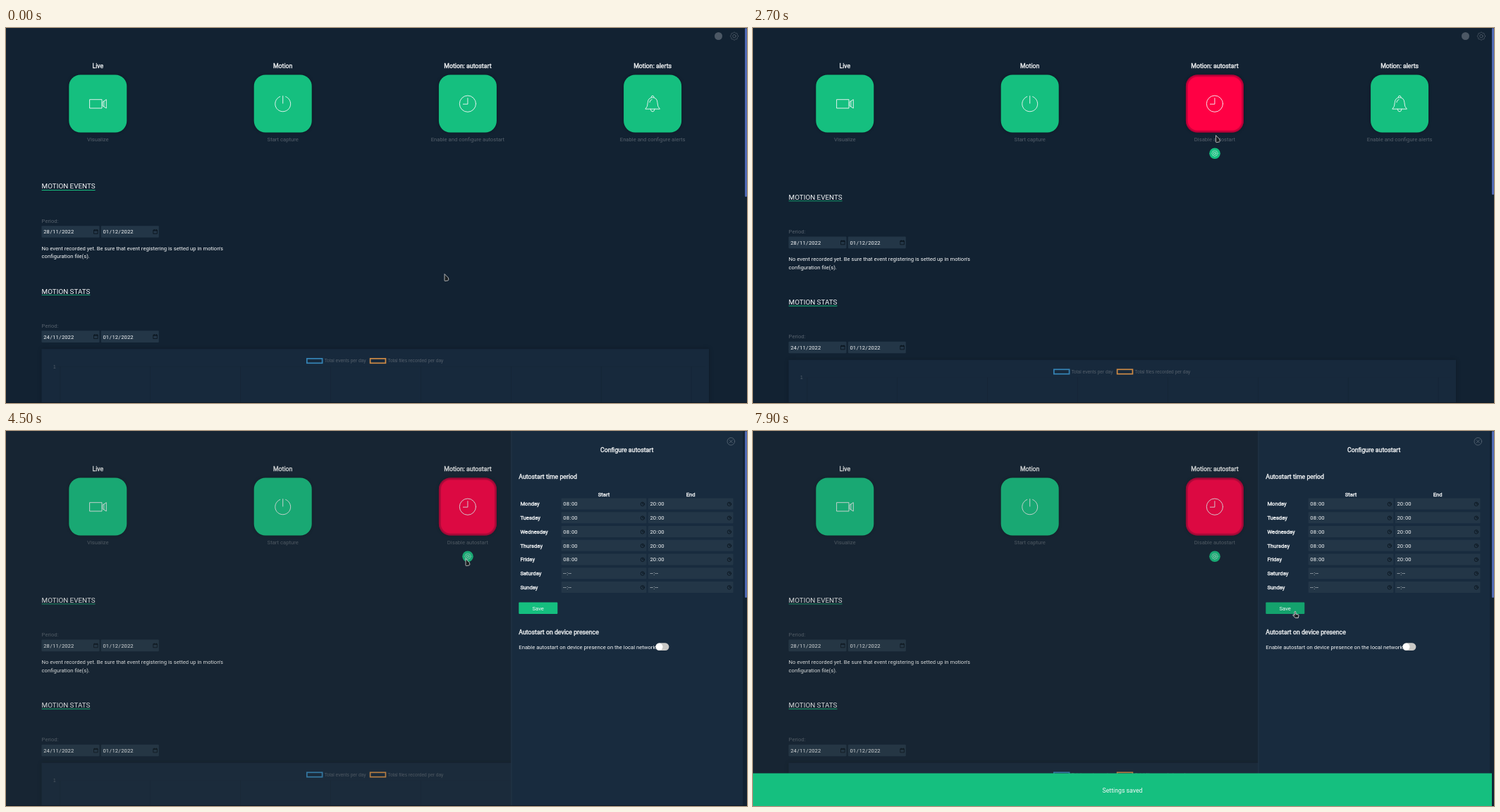
Recreate the animation shown at these times as an HTML page with a canvas. Size 1051 by 533 pixels, loop 8000 ms.

```html
<!DOCTYPE html>
<html lang="en">
<head>
<meta charset="utf-8">
<title>Motion dashboard</title>
<style>
  html, body { margin: 0; width: 100%; height: 100%; overflow: hidden; background: #122232; }
  canvas { display: block; }
</style>
</head>
<body>
<canvas id="stage" width="1051" height="533"></canvas>
<script>
const ctx = document.getElementById('stage').getContext('2d');
const LOOP = 8000, STEP = 100;
const GREEN = '#15bf7f', HOVER = '#14a26d', WHITE = '#f5f7f8', GREY = '#55606c', INPUT = '#233647', DARK = '#0a131c';
const SMALL = 7.66, MEDIUM = 8.76, LARGE = 9.85;

// Pointer tip: time, x, y
const pointer = [
  [0, 622, 350], [200, 622, 340], [500, 633, 252], [800, 644, 167], [900, 646, 153],
  [1000, 649, 147], [1400, 658, 138], [2600, 658, 138], [2800, 655, 168], [3000, 654, 182],
  [3600, 654, 182], [3700, 652, 182], [4500, 652, 182], [4800, 715, 158], [5100, 830, 147],
  [5400, 919, 186], [5600, 921, 215], [5700, 915, 233], [5900, 800, 195], [6000, 790, 145],
  [6200, 860, 90], [6300, 885, 85], [6400, 910, 130], [6500, 923, 166], [6600, 923, 166],
  [7000, 850, 222], [7400, 768, 256], [8000, 768, 256]
];

const clamp = v => Math.max(0, Math.min(1, v));
const swing = v => .5 - Math.cos(Math.PI * clamp(v)) / 2;
const mix = (a, b, p) => a + (b - a) * p;

function pointerAt(t) {
  const i = pointer.findIndex(k => k[0] > t);
  const a = pointer[i - 1], b = pointer[i], p = (t - a[0]) / (b[0] - a[0]);
  return [mix(a[1], b[1], p), mix(a[2], b[2], p)];
}

function box(x, y, w, h, fill, r = 0) {
  ctx.fillStyle = fill;
  ctx.beginPath();
  ctx.roundRect(x, y, w, h, r);
  ctx.fill();
}

function text(str, x, y, { size = SMALL, color = WHITE, align = 'left', bold = false, font = 'Roboto' } = {}) {
  ctx.font = `${size}px ${font}, sans-serif`;
  ctx.textAlign = align;
  ctx.fillStyle = ctx.strokeStyle = color;
  ctx.fillText(str, x, y);
  if (bold) {
    ctx.lineWidth = .35;
    ctx.strokeText(str, x, y);
  }
}

function shape(d, x, y, stroke = WHITE, width = .9, fill) {
  const path = new Path2D(d);
  ctx.save();
  ctx.translate(x, y);
  ctx.lineJoin = ctx.lineCap = 'round';
  if (fill) { ctx.fillStyle = fill; ctx.fill(path); }
  ctx.strokeStyle = stroke;
  ctx.lineWidth = width;
  ctx.stroke(path);
  ctx.restore();
}

const circle = r => `M${r} 0A${r} ${r} 0 1 1 ${-r} 0A${r} ${r} 0 1 1 ${r} 0Z`;

function cog(x, y, r, color) {
  let d = circle(r * .4);
  for (let i = 0; i <= 48; i++) {
    const a = i * Math.PI / 24, q = r * (.92 + .08 * Math.cos(8 * a));
    d += `${i ? 'L' : 'M'}${q * Math.cos(a)} ${q * Math.sin(a)}`;
  }
  shape(d, x, y, color, .7);
}

// Date and time inputs pad every group of digits
function segments(str, x, y) {
  for (const part of str.split(/([:/])/)) {
    const pad = /[:/]/.test(part) ? 0 : .55;
    text(part, x + pad, y);
    x += ctx.measureText(part).width + 2 * pad;
  }
}

function dateInput(str, x, y) {
  box(x, y, 82, 16.6, INPUT, 1);
  segments(str, x + 2.2, y + 11.2);
  shape('M-2.6-2.2H2.6V3H-2.6ZM-2.6-1.4H2.6M-1.5-3V-2M1.5-3V-2', x + 77, y + 8.2, DARK, .8);
}

function timeInput(str, x, y, w) {
  box(x, y - 8, w, 16, INPUT, 1);
  segments(str, x + 2.2, y + 2.8);
  shape(circle(2.7) + 'M0-1.6V0H1.4', x + w - 5.6, y + .3, DARK, .8);
}

const icons = {
  camera: 'M-11.3-6H5.7V6.3H-11.3ZM6.8-2.5L8.6-3.8V4.2L6.8 3ZM8.6-3.8L12-6V6.3L8.6 4.2',
  power: 'M-4-10.2A11 11 0 1 0 4-10.2M0-11V-.6',
  clock: circle(11.6) + 'M0-8V.5H-6.5',
  bell: 'M-10 7.2Q-6.8 4.5-6.8-2Q-6.3-8.5 0-9Q6.3-8.5 6.8-2Q6.8 4.5 10 7.2ZM-2-9.2Q-1.7-11.5 0-11.5Q1.7-11.5 2-9.2M-3 7.4Q-2.5 11.2 0 11.2Q2.5 11.2 3 7.4M-4.3-2Q-4-5.5-1-6.2'
};

function tile(x, title, icon, label, color, active) {
  text(title, x, 57, { size: MEDIUM, align: 'center', bold: true });
  ctx.shadowColor = 'rgba(0,0,0,.3)';
  ctx.shadowBlur = 4;
  box(x - 41, 66.5, 82, 82, color, 16.4);
  ctx.shadowBlur = 0;
  if (active) {
    for (const w of [1.2, 3]) {
      ctx.strokeStyle = 'rgba(110,0,45,.35)';
      ctx.lineWidth = w;
      ctx.beginPath();
      ctx.roundRect(x - 41 + w / 2, 66.5 + w / 2, 82 - w, 82 - w, 16.4 - w / 2);
      ctx.stroke();
    }
  }
  shape(icons[icon], x, 107.7);
  text(label, x, 160.7, { color: GREY, align: 'center' });
}

function heading(str, y) {
  text(str, 50.6, y, { size: LARGE });
  box(50.6, y + 1.7, ctx.measureText(str).width, .9, GREEN);
}

function period(from, y) {
  text('Period:', 50.6, y, { color: GREY });
  dateInput(from, 50.5, y + 4.3);
  dateInput('01/12/2022', 134.8, y + 4.3);
}

function chart(y) {
  ctx.shadowColor = 'rgba(0,0,0,.25)';
  ctx.shadowBlur = 6;
  box(50.5, y, 946.5, 120, '#17293c');
  ctx.shadowBlur = 0;
  const label = { size: 6.57, color: GREY, font: 'Liberation Sans' };
  [['#3585b7', 'Total events per day', 426], ['#cd8a45', 'Total files recorded per day', 515.8]].forEach(([color, name, x]) => {
    ctx.strokeStyle = color;
    ctx.lineWidth = 1.7;
    ctx.strokeRect(x + .8, y + 13.6, 21.8, 6.4);
    text(name, x + 25.8, y + 18.8, label);
  });
  text('1', 67, y + 27.5, label);
  for (let x = 76.5; x < 990; x += 127.9) box(x, y + 25, .6, 100, 'rgba(0,0,0,.14)');
  box(72, y + 25, 920, .6, 'rgba(0,0,0,.08)');
}

function configButton(t) {
  const open = t < 4000 ? clamp((t - 2750) / 250) : 1 - clamp((t - 4000) / 400);
  const w = mix(15.6, 88.5, open), left = 655 - w / 2;
  ctx.save();
  box(left, 170.5, w, 15.4, open > 0 ? HOVER : GREEN, 7.7);
  ctx.clip();
  cog(left + 7.8, 178.2, 4.2, '#c9eedf');
  if (open > 0) text('Configure autostart', left + 16.3, 181);
  ctx.restore();
}

function tooltip() {
  box(657.2, 190.3, 73, 14, '#d0d0ce', 1);
  box(658, 191.1, 71.4, 12.4, '#1e2021');
  text('Configure autostart', 662, 199.7, { size: 6.92, color: '#dddddb', font: 'Noto Sans' });
}

function panel(p, saveHover) {
  const right = 1045, left = right - 328.6 * p, x = left + 10.9;
  const col = left + 71.2, w = Math.max(10, (1029.3 - col) / 2), end = col + w + 2.2;
  const bold = { bold: true }, center = { bold: true, align: 'center' };
  ctx.save();
  box(left, 0, right - left, 533, '#182b3e');
  ctx.clip();
  box(left, 0, .8, 533, '#2d4052');
  shape(circle(5.3) + 'M-2-2L2 2M2-2L-2 2', 1028.3, 14.8, '#5c6a78', .8);
  text('Configure autostart', (left + right) / 2, 29.6, { ...center, size: MEDIUM });
  text('Autostart time period', x, 67.8, { ...bold, size: MEDIUM });
  text('Start', col + w / 2, 92.7, center);
  text('End', end + w / 2, 92.7, center);
  ['Monday', 'Tuesday', 'Wednesday', 'Thursday', 'Friday', 'Saturday', 'Sunday'].forEach((day, i) => {
    const y = 103.6 + 19.74 * i;
    text(day, left + 13, y + 2.8, bold);
    timeInput(i < 5 ? '08:00' : '--:--', col, y, w);
    timeInput(i < 5 ? '20:00' : '--:--', end, y, w);
  });
  box(x, 243.4, 55, 16.6, saveHover ? HOVER : GREEN, 1);
  text('Save', x + 27.4, 254.6, { align: 'center' });
  text('Autostart on device presence', x, 289, { ...bold, size: MEDIUM });
  text('Enable autostart on device presence on the local network', x, 309.5);
  box(left + 204.8, 301.3, 19.2, 10.8, '#c9c9c6', 5.4);
  box(left + 205.3, 301.8, 9.8, 9.8, '#fff', 4.9);
  ctx.restore();
}

function drawPointer(x, y, hand) {
  if (hand) shape('M1.5 5.2V.9Q1.6 0 2.4 0Q3.2 0 3.3.9V3.8L6.4 4.4Q7.6 4.8 7.4 6L6.7 9.2H2.8L-.8 5.8Q-.9 4.6 0 4.6Z', x - 1.4, y + .4, '#f2f2f2', .8, '#202426');
  else shape('M0 0V8.8Q.2 9.9 1.2 9.6L5 8.9Q6 8.4 5.8 7.2L5.4 5.4Z', x, y, '#d8d8d8', .8, '#1b2022');
}

function draw(t) {
  const [px, py] = pointerAt(t);
  const active = t >= 1900, shift = active ? 15.4 : 0;
  const hover = active ? 0 : clamp((t - 900) / 400);
  const fade = `rgb(${mix(21, 20, hover)},${mix(191, 162, hover)},${mix(127, 109, hover)})`;

  box(0, 0, 1051, 533, '#122232');
  box(1005, 6, 11, 11, '#4c5865', 5.5);
  cog(1033, 11.6, 5.6, '#5c6773');
  tile(130.3, 'Live', 'camera', 'Visualize', GREEN);
  tile(392.7, 'Motion', 'power', 'Start capture', GREEN);
  tile(654.9, 'Motion: autostart', 'clock', active ? 'Disable autostart' : 'Enable and configure autostart', active ? '#ff0044' : fade, active);
  tile(917.1, 'Motion: alerts', 'bell', 'Enable and configure alerts', GREEN);
  if (active) configButton(t);

  ctx.save();
  ctx.translate(0, shift);
  heading('MOTION EVENTS', 228.3);
  period('28/11/2022', 276.9);
  text("No event recorded yet. Be sure that event registering is setted up in motion's", 50.6, 315.9);
  text('configuration file(s).', 50.6, 327.3);
  heading('MOTION STATS', 377.5);
  period('24/11/2022', 426);
  chart(456.3);
  ctx.restore();

  const shade = 1045 * swing((t - 3730) / 400), slide = swing((t - 3726) / 400);
  if (shade > 0) box(1045 - shade, 0, shade, 533, 'rgba(50,58,58,.17)');
  const onSave = t > 6700 && px > 727 && px < 782 && py > 243;
  if (slide > 0) panel(slide, onSave);

  box(0, 532, 1051, 1, '#0d1926');
  box(1048, 0, 3, active ? 237 : 240, '#5069b4', 1.5);
  if (t >= 3500 && t < 3700) tooltip();
  if (t >= 7900) {
    box(0, 486.4, 1048, 46.6, GREEN);
    text('Settings saved', 524, 514, { size: MEDIUM, align: 'center' });
  }
  const onTile = py < 149 && t < 3700, onConfig = py > 170 && t >= 2700 && t < 3700;
  drawPointer(px, py, onTile || onConfig || onSave);
}

function tick(now) {
  draw(Math.floor(now % LOOP / STEP) * STEP);
  requestAnimationFrame(tick);
}
requestAnimationFrame(tick);
</script>
</body>
</html>
```
